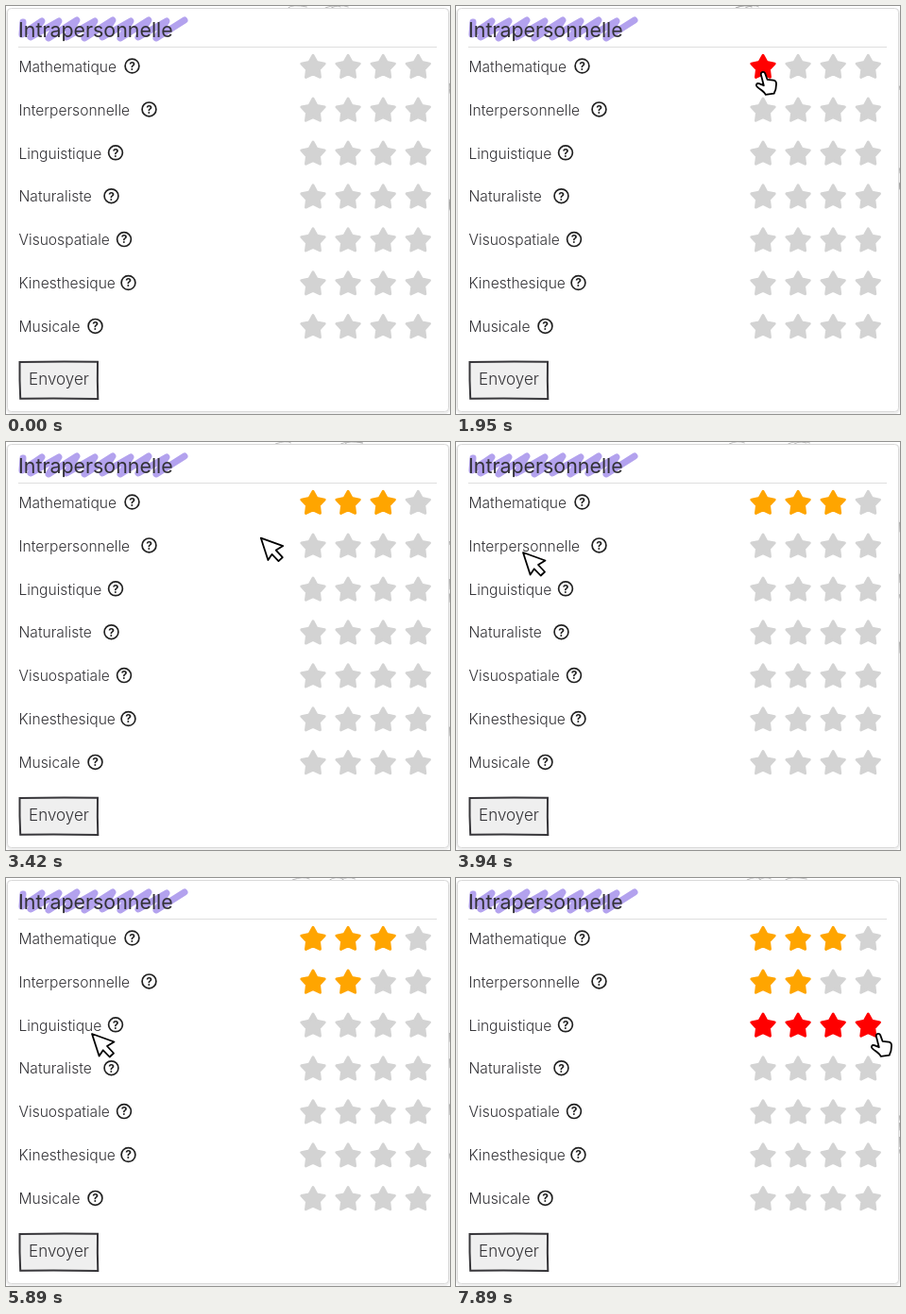
Recreate the animation shown at these times as an HTML page. Size 470 by 432 pixels, loop 8 s.

```html
<!DOCTYPE html>
<html lang="fr">
<head>
<meta charset="utf-8">
<title>Intelligences</title>
<style>
  html, body { margin: 0; width: 100%; height: 100%; overflow: hidden; background: #fff; }
  svg { display: block; }
  text { font: 300 15.6px Inter, "Liberation Sans", sans-serif; fill: #333236; }
  .title { font-size: 21.4px; font-weight: 400; }
  .button { font-size: 17px; }
  .mark { font-size: 12px; font-weight: 700; fill: #222; }
  .star { fill: #d3d3d3; stroke: #d3d3d3; stroke-width: 2.8; stroke-linejoin: round; }
  .star.rated { fill: orange; stroke: orange; }
  .star.hover { fill: red; stroke: red; }
  .pointer { fill: #fff; stroke: #000; stroke-width: 1.8; stroke-linejoin: round; stroke-linecap: round; }
</style>
</head>
<body>
<svg id="stage" width="470" height="432" viewBox="0 0 470 432">
  <path id="sketch" fill="none" stroke="#aaa" stroke-width=".8"/>
  <rect x="1.5" y="3.5" width="467" height="427" rx="4" fill="none" stroke="#000" stroke-opacity=".06" stroke-width="3"/>
  <rect x="1.5" y="2.5" width="467" height="427" rx="4" fill="#fff" stroke="#d9d9d9"/>
  <path id="highlight" fill="none" stroke="#b3a2ee" stroke-width="7" stroke-linejoin="round" stroke-linecap="round"/>
  <text class="title" x="13" y="33">Intrapersonnelle</text>
  <path d="M13 43.5H456" stroke="#dedede"/>
  <g id="rows"></g>
  <path d="M14.5 377Q56 376.2 97 376.8Q96.6 397 97.3 416Q56 415.2 15.2 415.8Q14.2 396 14.5 377Z" fill="#efefef" stroke="#37363a" stroke-width="2"/>
  <text class="button" x="56" y="401" text-anchor="middle">Envoyer</text>
  <path id="arrow" class="pointer" d="M0 0L23.5 8.5L16 13L23 20.5L18.7 24.5L11.8 17.3L7.6 23.5Z"/>
  <path id="hand" class="pointer" d="M-2.2 2.5C-2.4 -.4 1.3 -1 2.2 1.4L4.5 7.8L11 8.6C13.4 9 14.2 10.6 14 13L13.5 17.5C13.2 20 12 20.5 11.8 22.6L2.6 23.8C1.4 20.6 -2.4 19 -6.4 15.4C-8.2 13.4 -6.4 11.4 -4.2 12.2L.8 14.2Z"/>
</svg>
<script>
const LOOP = 8000, FIRST_ROW = 64.3, ROW_STEP = 45.9, FIRST_STAR = 325, STAR_STEP = 37.1;
const byId = id => document.getElementById(id);

// label, x of its help icon
const skills = [["Mathematique", 133.5], ["Interpersonnelle", 151.5], ["Linguistique", 116],
  ["Naturaliste", 111.5], ["Visuospatiale", 125], ["Kinesthesique", 129.5], ["Musicale", 94.5]];

// row, number of stars, click time
const ratings = [[0, 3, 2880], [1, 2, 5110]];

// time, x, y of the pointer tip
const route = [
  [650, -30, 150], [1170, 30, 77], [1820, 318, 69], [2080, 332, 71], [2600, 379, 74],
  [2860, 401, 73], [3030, 401, 74], [3300, 290, 100], [3940, 71, 117], [4200, 90, 117],
  [4720, 328, 115], [5110, 366, 116], [5250, 366, 117], [5890, 91, 165], [6060, 93, 165],
  [6460, 325, 167], [6720, 366, 168], [7240, 401, 167], [7890, 447, 165], [LOOP, 447, 165]
];

function add(parent, name, attributes, content = "") {
  const node = document.createElementNS("http://www.w3.org/2000/svg", name);
  for (const key in attributes) node.setAttribute(key, attributes[key]);
  node.textContent = content;
  return parent.appendChild(node);
}

function starPath(cx, cy) {
  const points = Array.from({ length: 10 }, (_, i) => {
    const angle = i * Math.PI / 5 - Math.PI / 2, radius = i % 2 ? 6.9 : 12.9;
    return [cx + radius * Math.cos(angle), cy + radius * Math.sin(angle)].map(v => v.toFixed(2));
  });
  return "M" + points.join("L") + "Z";
}

const stars = skills.map(([label, iconX], row) => {
  const y = FIRST_ROW + row * ROW_STEP, parent = byId("rows");
  add(parent, "text", { x: 13.5, y: y + 5.4 }, label);
  add(parent, "circle", { cx: iconX, cy: y - .8, r: 7.4, fill: "none", stroke: "#222", "stroke-width": 1.7 });
  add(parent, "text", { x: iconX, y: y + 3.5, class: "mark", "text-anchor": "middle" }, "?");
  return [0, 1, 2, 3].map(i => add(parent, "path", { d: starPath(FIRST_STAR + i * STAR_STEP, y + .7) }));
});

let scribble = "M18 17L17 30L38 16";
for (let i = 0; i < 8; i++) scribble += `L${26 + i * 19} ${33 + i % 2}L${56 + i * 19} ${16 - i % 2}`;
byId("highlight").setAttribute("d", scribble);

// The picture advances in short steps with a few longer holds.
function stepTime(t) {
  const base = [0, 2730, 2880, 3030, 5890, 6060, 6190, 6330].findLast(start => start <= t);
  return base + Math.floor((t - base) / 130) * 130;
}

function pointerAt(t) {
  const next = route.findIndex(stop => stop[0] > t);
  if (next < 1) return null;
  const [t0, x0, y0] = route[next - 1], [t1, x1, y1] = route[next];
  const u = (t - t0) / (t1 - t0), eased = u * u * (3 - 2 * u);
  return { x: x0 + (x1 - x0) * eased, y: y0 + (y1 - y0) * eased };
}

function place(id, visible, point) {
  const node = byId(id);
  node.style.display = visible ? "" : "none";
  if (visible) node.setAttribute("transform", `translate(${point.x} ${point.y})`);
}

// Slivers of the moving drawing behind the card.
function sketchPath(t) {
  let seed = t + 1;
  const random = () => (seed = seed * 16807 % 2147483647) / 2147483647;
  random(); random();
  let d = "";
  for (let i = 0; i < 3; i++) d += `M${280 + random() * 85} 2q${4 + random() * 8} -4 ${12 + random() * 12} -1`;
  for (let i = 0; i < 4; i++) d += `M469.5 ${80 + random() * 240}l-.5 ${4 + random() * 8}`;
  return d;
}

function draw(time) {
  const t = stepTime(time % LOOP), point = pointerAt(t);
  const row = point ? Math.round((point.y - FIRST_ROW) / ROW_STEP) : -1;
  const star = point ? Math.floor((point.x - FIRST_STAR) / STAR_STEP + .5) : -1;
  const hovering = star >= 0 && star < 4 && row >= 0 &&
    Math.abs(point.y - FIRST_ROW - row * ROW_STEP) < 16;

  stars.forEach((line, r) => {
    const rating = ratings.find(([rated, , time]) => rated === r && t >= time)?.[1] ?? 0;
    line.forEach((node, i) => {
      const state = hovering && r === row ? (i <= star ? "hover" : "") : i < rating ? "rated" : "";
      node.setAttribute("class", "star " + state);
    });
  });
  place("arrow", point && !hovering, point);
  place("hand", hovering, point);
  byId("sketch").setAttribute("d", sketchPath(t));
}

const start = performance.now();
function tick() {
  draw(performance.now() - start);
  requestAnimationFrame(tick);
}
tick();
</script>
</body>
</html>
```
